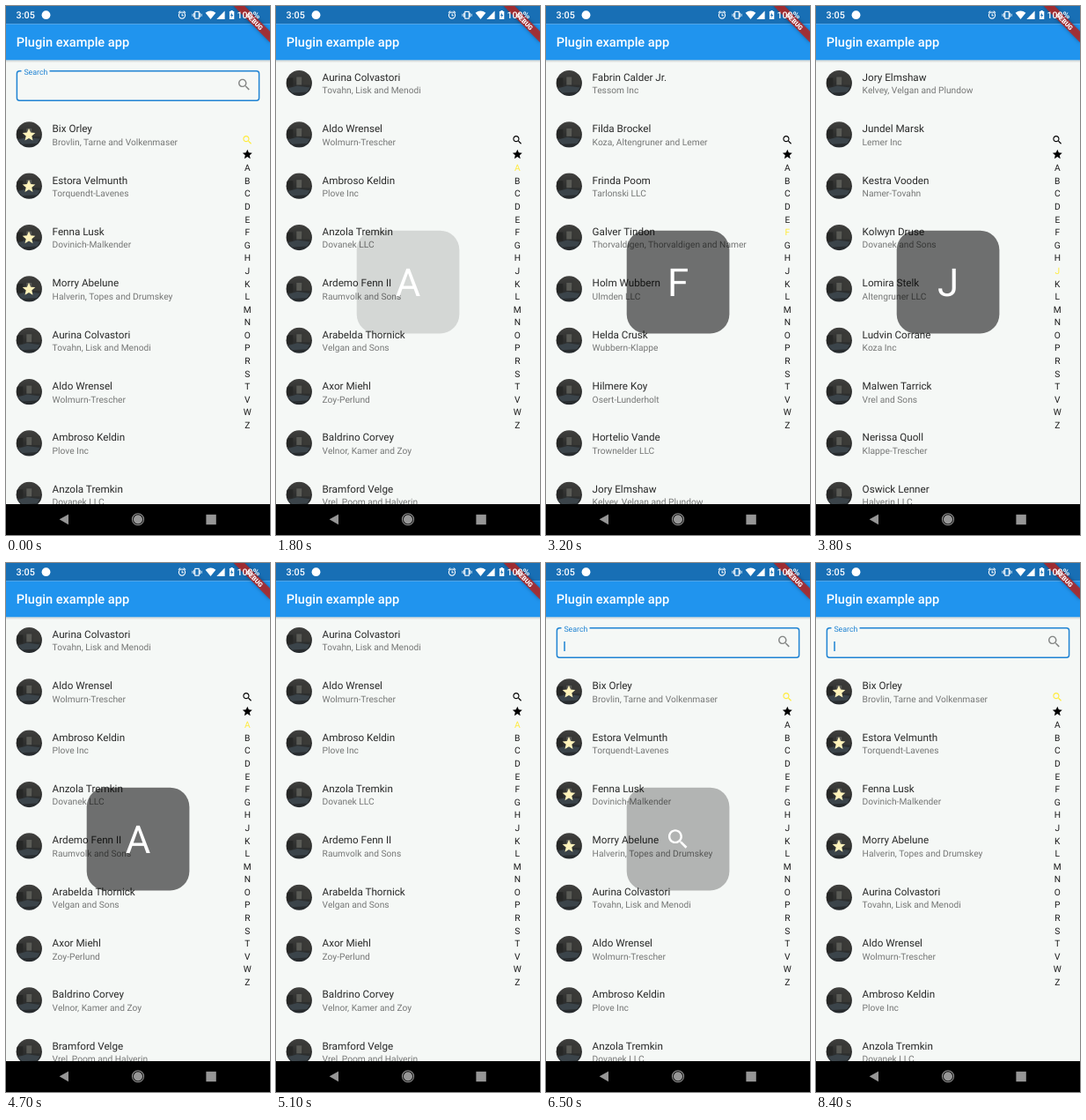
These frames come from a looping animation (300x600 px, 8.8 s). An HTML page with a canvas:

```html
<!DOCTYPE html>
<html lang="en">
<head>
<meta charset="utf-8">
<title>Alphabet list</title>
<style>
html, body { margin: 0; width: 100%; height: 100%; overflow: hidden; background: #f5f8f6; }
canvas { display: block; width: 300px; height: 600px; }
</style>
</head>
<body>
<canvas id="stage"></canvas>
<script>
const LOOP = 8800, STEP = 100, FADE = 250;
const LIST_TOP = 61.3, PITCH = 58.35, NAV_TOP = 565;
const YELLOW = '#ffeb3b', BLUE = '#1f83d3', NAV_GREY = '#969696';

const canvas = document.getElementById('stage');
const ctx = canvas.getContext('2d');
const ratio = window.devicePixelRatio || 1;
canvas.width = 300 * ratio;
canvas.height = 600 * ratio;
ctx.textRendering = 'geometricPrecision';

const icons = {
  star: new Path2D('M12 17.27L18.18 21l-1.64-7.03L22 9.24l-7.19-.61L12 2 9.19 8.63 2 9.24l5.46 4.73L5.82 21z'),
  search: new Path2D('M15.5 14h-.79l-.28-.27C15.41 12.59 16 11.11 16 9.5 16 5.91 13.09 3 9.5 3S3 5.91 3 9.5 5.91 16 9.5 16c1.61 0 3.09-.59 4.23-1.57l.27.28v.79l5 4.99L20.49 19l-4.99-5zm-6 0C7.01 14 5 11.99 5 9.5S7.01 5 9.5 5 14 7.01 14 9.5 11.99 14 9.5 14z')
};

const FAVORITES = 4;
const contacts = `Bix Orley|Brovlin, Tarne and Volkenmaser
Estora Velmunth|Torquendt-Lavenes
Fenna Lusk|Dovinich-Malkender
Morry Abelune|Halverin, Topes and Drumskey
Aurina Colvastori|Tovahn, Lisk and Menodi
Aldo Wrensel|Wolmurn-Trescher
Ambroso Keldin|Plove Inc
Anzola Tremkin|Dovanek LLC
Ardemo Fenn II|Raumvolk and Sons
Arabelda Thornick|Velgan and Sons
Axor Miehl|Zoy-Perlund
Baldrino Corvey|Velnor, Kamer and Zoy
Bramford Velge|Vrel, Poom and Halverin
Brisella Tondar|Ulmden LLC
Calvera Nost|Kelvey Inc
Corwen Haldine|Plundow and Sons
Dalvin Ostrek|Menodi-Lavenes
Dorisa Plume|Tarne LLC
Elvard Quinsey|Topes, Lisk and Kamer
Emmira Dusk|Drumskey Inc
Fabrin Calder Jr.|Tessom Inc
Filda Brockel|Koza, Altengruner and Lemer
Frinda Poom|Tarlonski LLC
Galver Tindon|Thorvaldigen, Thorvaldigen and Namer
Holm Wubbern|Ulmden LLC
Helda Crusk|Wubbern-Klappe
Hilmere Koy|Osert-Lunderholt
Hortelio Vande|Trownelder LLC
Jory Elmshaw|Kelvey, Velgan and Plundow
Jundel Marsk|Lemer Inc
Kestra Vooden|Namer-Tovahn
Kolwyn Druse|Dovanek and Sons
Lomira Stelk|Altengruner LLC
Ludvin Corrane|Koza Inc
Malwen Tarrick|Vrel and Sons
Nerissa Quoll|Klappe-Trescher
Oswick Lenner|Halverin LLC
Pelora Vint|Tessom, Plove and Kamer`.split('\n').map(line => line.split('|'));

const indexKeys = ['search', 'star', ...'ABCDEFGHJKLMNOPRSTVWZ'];

// Time at which each index entry becomes selected.
const selections = [
  [0, 'search'], [1800, 'A'], [2300, 'B'], [2500, 'C'], [2800, 'D'], [3000, 'E'],
  [3200, 'F'], [3400, 'G'], [3600, 'H'], [3800, 'J'], [4000, 'H'], [4100, 'G'],
  [4200, 'F'], [4300, 'D'], [4600, 'B'], [4700, 'A'], [5400, 'star'], [6100, 'search']
];
const presses = [[1740, 4750], [5340, 5750], [6040, 6375]];
const caretShown = [[400, 900], [1400, 1800], [6400, 6800], [7400, 7900], [8400, 8800]];

const clamp = v => Math.max(0, Math.min(1, v));

function rect(x, y, w, h, color) {
  ctx.fillStyle = color;
  ctx.fillRect(x, y, w, h);
}

function shape(color, build) {
  ctx.fillStyle = color;
  ctx.beginPath();
  build();
  ctx.fill();
}

const polygon = (color, ...points) =>
  shape(color, () => points.forEach(([x, y]) => ctx.lineTo(x, y)));

const disc = (x, y, r, color) => shape(color, () => ctx.arc(x, y, r, 0, 7));

function ring(x, y, r, width, color) {
  ctx.strokeStyle = color;
  ctx.lineWidth = width;
  ctx.beginPath();
  ctx.arc(x, y, r, 0, 7);
  ctx.stroke();
}

function text(value, x, y, size, color, weight = 400, align = 'left') {
  ctx.font = `${weight} ${size}px Roboto, sans-serif`;
  ctx.textAlign = align;
  ctx.fillStyle = color;
  ctx.fillText(value, x, y);
}

function icon(name, x, y, size, color) {
  ctx.save();
  ctx.translate(x - size / 2, y - size / 2);
  ctx.scale(size / 24, size / 24);
  ctx.fillStyle = color;
  ctx.fill(icons[name]);
  ctx.restore();
}

function avatar(x, y, favorite) {
  ctx.save();
  ctx.beginPath();
  ctx.arc(x, y, 14.6, 0, 7);
  ctx.clip();
  ctx.translate(x, y);
  const tone = ctx.createLinearGradient(0, -15, 0, 15);
  tone.addColorStop(0, '#41413f');
  tone.addColorStop(0.5, '#2e2f2e');
  tone.addColorStop(1, '#262b2f');
  rect(-15, -15, 30, 30, tone);
  rect(-15, -6, 8, 10, '#262726');
  rect(-3, -7, 6, 9, '#5a5b56');
  rect(4, -9, 9, 11, '#3a3a37');
  polygon('#3b444a', [-13, 6], [-2, 3], [12, 5], [9, 10], [-8, 11]);
  ctx.restore();
  if (favorite) icon('star', x - 0.3, y + 0.2, 17.5, '#fff3bb');
}

function searchField(caret) {
  ctx.strokeStyle = BLUE;
  ctx.lineWidth = 1.5;
  ctx.beginPath();
  ctx.roundRect(12.4, 73.7, 275.2, 33.6, 3);
  ctx.stroke();
  rect(17.5, 72, 32, 4, '#f5f8f6');
  text('Search', 20.4, 77.6, 8.75, BLUE);
  icon('search', 270.6, 89.2, 17.5, '#858786');
  if (caret) rect(20.3, 89, 1.5, 11, BLUE);
}

function contactList(key, caret) {
  const first = key.length > 1 ? 0
    : contacts.findIndex(([name], i) => i >= FAVORITES && name[0] === key);
  const offset = key === 'search' ? 1 : 0;
  if (offset) searchField(caret);
  for (let row = offset; row < 9; row++) {
    const i = first + row - offset;
    const [name, company] = contacts[i];
    const y = LIST_TOP + 26.2 + row * PITCH;
    avatar(26.3, y, i < FAVORITES);
    text(name, 52.6, y - 2.6, 11.68, 'rgba(0,0,0,.84)');
    text(company, 52.6, y + 11.9, 10.22, 'rgba(0,0,0,.52)');
  }
}

function alphabet(selected) {
  indexKeys.forEach((key, i) => {
    const active = key === selected;
    if (key.length > 1) icon(key, 274.3, 152 + i * 16.2, 13.2, active ? YELLOW : '#000');
    else text(key, 274.3, 187.3 + (i - 2) * 14.58, 10.22, active ? YELLOW : '#1c1c1c', 400, 'center');
  });
}

// Only the panel fades; its symbol stays solid white.
function preview(key, opacity) {
  if (!opacity) return;
  shape(`rgba(0,0,0,${0.55 * opacity})`, () => ctx.roundRect(91.7, 254.7, 116.7, 116.7, 21.9));
  if (key.length > 1) icon(key, 150, 313.2, 29.5, '#fff');
  else text(key, 150, 328.8, 43.8, '#fff', 400, 'center');
}

function statusBar() {
  text('3:05', 11.5, 14.3, 10.8, '#fff', 500);
  disc(45.5, 10.2, 4.9, '#fff');

  ring(200, 10.6, 3.6, 1.1, '#fff');
  polygon('#fff', [195.6, 7.3], [198, 5.2], [198.6, 6], [196.3, 8]);
  polygon('#fff', [204.4, 7.3], [202, 5.2], [201.4, 6], [203.7, 8]);
  rect(199.7, 8.4, 0.9, 2.8, '#fff');
  rect(199.7, 10.4, 2.4, 0.9, '#fff');

  ctx.strokeStyle = '#fff';
  ctx.lineWidth = 1.1;
  ctx.strokeRect(214.8, 6.4, 4.4, 7.8);
  for (const side of [-1, 1]) {
    rect(216.6 + side * 3.5, 7.7, 0.9, 5.2, '#fff');
    rect(216.6 + side * 5.1, 8.8, 0.9, 3, '#fff');
  }

  shape('#fff', () => {
    ctx.moveTo(232.5, 15);
    ctx.lineTo(226.6, 7.7);
    ctx.quadraticCurveTo(232.5, 3.5, 238.4, 7.7);
  });
  polygon('#fff', [239.3, 15], [248.6, 15], [248.6, 5.6]);
  rect(253.9, 6, 5.4, 9, '#fff');
  rect(255.5, 5, 2.2, 1.2, '#fff');
  polygon('#186fb5', [257, 7.5], [255, 11], [256.4, 11], [256.2, 13.6], [258.2, 10], [256.8, 10]);
  text('100%', 262.5, 14.3, 10.5, '#fff', 500);
}

function appBar() {
  const shadow = ctx.createLinearGradient(0, LIST_TOP, 0, LIST_TOP + 3);
  shadow.addColorStop(0, 'rgba(0,0,0,.16)');
  shadow.addColorStop(1, 'rgba(0,0,0,0)');
  rect(0, LIST_TOP, 300, 3, shadow);
  rect(0, 0, 300, 20.4, '#186fb5');
  rect(0, 20.4, 300, LIST_TOP - 20.4, '#2094ee');
  text('Plugin example app', 11.7, 46, 14.6, '#fff', 500);
}

function navBar() {
  rect(0, NAV_TOP, 300, 35, '#000');
  polygon(NAV_GREY, [60.6, 582.3], [71, 576.4], [71, 588.2]);
  disc(150, 582.3, 5.1, NAV_GREY);
  ring(150, 582.3, 6.5, 1.1, NAV_GREY);
  rect(227.4, 576.8, 11.4, 11.4, NAV_GREY);
}

function debugBanner() {
  ctx.save();
  ctx.translate(300, 0);
  ctx.rotate(Math.PI / 4);
  ctx.shadowColor = 'rgba(0,0,0,.4)';
  ctx.shadowBlur = 4;
  rect(-29.2, 20.4, 58.4, 8.8, 'rgba(183,38,36,.85)');
  ctx.shadowBlur = 0;
  text('DEBUG', 0, 27.5, 7.4, '#fff', 900, 'center');
  ctx.restore();
}

function draw(time) {
  const t = Math.floor(time % LOOP / STEP) * STEP;
  const selected = selections.filter(([start]) => start <= t).pop()[1];
  const caret = caretShown.some(([from, to]) => t >= from && t < to);
  const opacity = t < 1800 ? 0 : Math.max(...presses.map(([down, up]) =>
    Math.min(clamp((t - down) / FADE), clamp(1 - (t - up) / FADE))));

  ctx.setTransform(ratio, 0, 0, ratio, 0, 0);
  rect(0, 0, 300, 600, '#f5f8f6');
  contactList(selected, caret);
  alphabet(selected);
  preview(selected, opacity);
  appBar();
  debugBanner();
  statusBar();
  navBar();
}

const began = performance.now();
function tick() {
  draw(performance.now() - began);
  requestAnimationFrame(tick);
}
tick();
</script>
</body>
</html>
```
